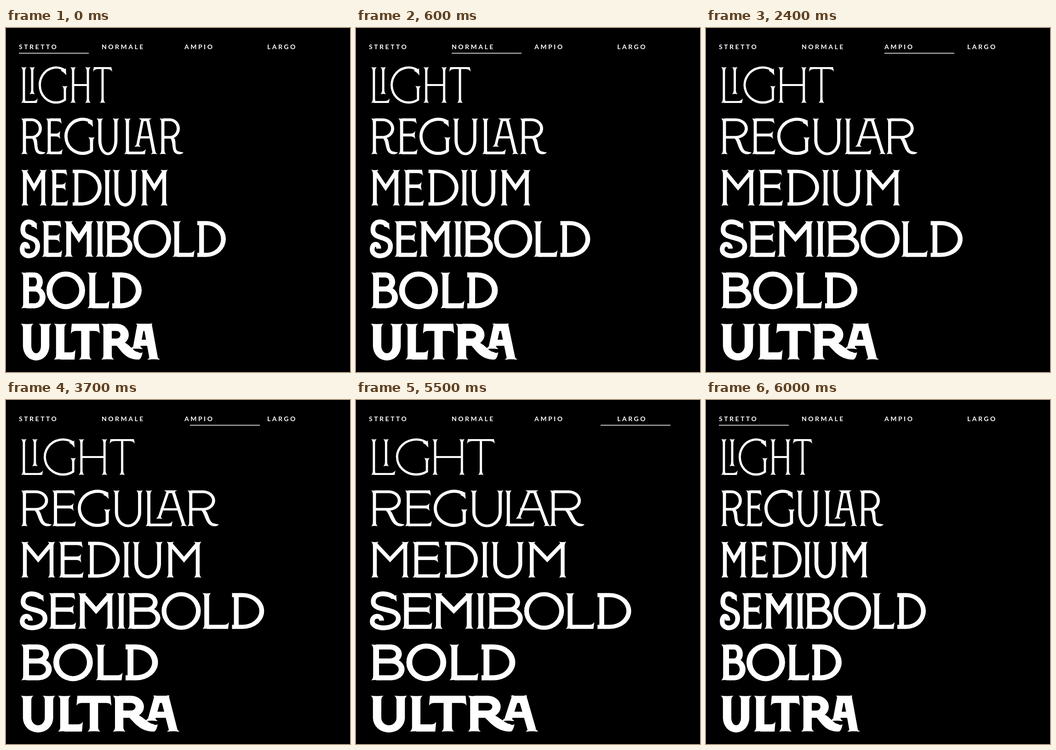
Write an HTML page with a canvas that moves like this. It is 748x748 px and loops after 7200 ms.

```html
<!DOCTYPE html>
<html lang="it">
<head>
<meta charset="utf-8">
<title>Width axis specimen</title>
<style>
  html, body { margin: 0; width: 100%; height: 100%; overflow: hidden; background: #000; }
  canvas { position: absolute; left: 0; top: 0; }
  span {
    position: absolute; top: 31px; color: #fff; white-space: nowrap;
    font: 700 14px/20px Lato, sans-serif; letter-spacing: 3.5px;
  }
</style>
</head>
<body>
<canvas width="748" height="748" role="img" aria-label="Light Regular Medium Semibold Bold Ultra"></canvas>
<span style="left:28px">STRETTO</span>
<span style="left:208px">NORMALE</span>
<span style="left:388px">AMPIO</span>
<span style="left:568px">LARGO</span>
<script>
const ctx = document.querySelector('canvas').getContext('2d');
const CAP = 78, MID = CAP / 2, WAIST = 36, QUARTER = Math.PI / 2;
const WIDTH_STOPS = [0, 0.243, 0.62, 1];

// Left and right edges of each letter at both ends of the width axis.
// Lowercase marks ligature forms.
const rows = [
  { stem: 4.9, text: 'LiGHT',
    narrow: [33,69, 51,63, 71,134, 140,184, 189,231],
    wide: [33,87, 60,72, 88,162, 168,240, 245,307] },
  { stem: 6.8, text: 'REGULAR',
    narrow: [33,86, 87,123, 127,193, 197,246, 257,304, 279,329, 334,386],
    wide: [33,107, 108,168, 172,246, 253,326, 329,394, 352,429, 428,505] },
  { stem: 8.4, text: 'MEDIUM',
    narrow: [33,89, 97,135, 142,208, 213,227, 232,286, 293,352],
    wide: [33,117, 125,187, 194,269, 277,292, 299,371, 380,465] },
  { stem: 10.4, text: 'SEMIBOLD',
    narrow: [30,74, 78,122, 127,190, 196,213, 216,275, 277,359, 362,410, 413,478],
    wide: [30,99, 102,169, 173,260, 266,286, 291,369, 372,459, 463,526, 530,607] },
  { stem: 12.8, text: 'BOLD',
    narrow: [33,86, 88,172, 177,225, 228,295],
    wide: [33,107, 111,198, 205,269, 273,350] },
  { stem: 18.2, text: 'ULTrA',
    narrow: [32,99, 104,151, 141,204, 207,297, 270,335],
    wide: [32,112, 118,176, 160,243, 246,348, 320,401] }
];

let s, h, flare;   // stem width, bar height, serif overhang of the current row

const mix = (a, b, p) => a + (b - a) * p;
const inset = () => flare + s / 2;

function fill(draw) {
  ctx.beginPath();
  draw();
  ctx.fill('evenodd');
}

function stroke(draw, width = s) {
  ctx.lineWidth = width;
  ctx.beginPath();
  draw();
  ctx.stroke();
}

function stem(x, y0 = 0, y1 = CAP, top = flare, bottom = flare) {
  const a = x - s / 2, b = x + s / 2, d = Math.min(10, y1 - y0);
  fill(() => {
    ctx.moveTo(a - top, y0);
    ctx.quadraticCurveTo(x, y0 + 1.5, b + top, y0);
    ctx.quadraticCurveTo(b, y0 + 3, b, y0 + d);
    ctx.lineTo(b, y1 - d);
    ctx.quadraticCurveTo(b, y1 - 3, b + bottom, y1);
    ctx.quadraticCurveTo(x, y1 - 1.5, a - bottom, y1);
    ctx.quadraticCurveTo(a, y1 - 3, a, y1 - d);
    ctx.lineTo(a, y0 + d);
    ctx.quadraticCurveTo(a, y0 + 3, a - top, y0);
  });
}

// Horizontal arm from x0 whose end at x1 flares inwards (dir 1 down, -1 up).
function arm(x0, x1, edge, dir) {
  const side = Math.sign(x1 - x0), inner = edge + dir * h;
  fill(() => {
    ctx.moveTo(x0, edge);
    ctx.lineTo(x1 - 2 * side, edge);
    ctx.lineTo(x1, inner + dir * 6);
    ctx.quadraticCurveTo(x1 - 3 * side, inner, x1 - 11 * side, inner);
    ctx.lineTo(x0, inner);
  });
}

function bowl(x, right, y0, y1, round) {
  const cy = (y0 + y1) / 2, ry = (y1 - y0) / 2;
  const rx = Math.max(s + 2, Math.min((right - x) * round, ry * 1.2)), cx = right - rx;
  fill(() => {
    ctx.moveTo(x, y0);
    ctx.ellipse(cx, cy, rx, ry, 0, -QUARTER, QUARTER);
    ctx.lineTo(x, y1);
    ctx.lineTo(x, y1 - h);
    ctx.ellipse(cx, cy, rx - s, ry - h, 0, QUARTER, -QUARTER, true);
    ctx.lineTo(x, y0 + h);
  });
}

// Hanging tip that closes the upper curve of G and S.
function tip(x, y, back) {
  fill(() => {
    ctx.moveTo(x - back, y - s / 2);
    ctx.lineTo(x - 2, y - 1);
    ctx.lineTo(x + 1, y - 5);
    ctx.lineTo(x + 2, y + 11);
    ctx.quadraticCurveTo(x - 3, y + 4, x - back, y + s / 2 - 1);
  });
}

// Sweeping leg of R, tapering to an upturned point.
function leg(x, y, right, tipY) {
  fill(() => {
    ctx.moveTo(x - s / 2, y);
    ctx.bezierCurveTo(x + 8, y + 4 + s / 2, right - 24 - s, CAP, right - 9, CAP);
    ctx.quadraticCurveTo(right - 3, CAP, right, tipY);
    ctx.quadraticCurveTo(right - 5, CAP - s * 0.7, right - 10, CAP - s * 0.9);
    ctx.bezierCurveTo(right - 23, CAP - s, x + s + 8, y, x + s / 2, y);
  });
}

const glyphs = {
  A(l, r) {
    const apex = mix(l, r, 0.47), gap = 4 + s * 0.17, half = 12 + s * 0.35;
    const foot = 66 - s * 0.6, left = l + inset(), right = r - inset();
    stroke(() => {
      ctx.moveTo(apex - gap, 1);
      ctx.lineTo(left, foot - 3);
    }, h);
    stroke(() => {
      ctx.moveTo(apex + gap, 1);
      ctx.lineTo(right, CAP - 3);
    });
    fill(() => {
      ctx.moveTo(apex - half, 0);
      ctx.lineTo(apex + half, 0);
      ctx.quadraticCurveTo(apex + half - 6, 3, apex + half - 7, h);
      ctx.lineTo(apex - half + 7, h);
      ctx.quadraticCurveTo(apex - half + 6, 3, apex - half, 0);
    });
    stem(left, foot - 5, foot, 0);
    stem(right, CAP - 5, CAP, 0);
    ctx.fillRect(left + 3, 41 - h * 0.4, mix(apex, right, 0.55) - left - 3, h * 0.85);
  },
  B(l, r) {
    const x = l + inset();
    stem(x);
    bowl(x, r - 6, 0, WAIST + h / 2, 0.5);
    bowl(x, r, WAIST - h / 2, CAP, 0.55);
  },
  D(l, r) {
    stem(l + 3 + inset());
    bowl(l + 3, r, 0, CAP, 0.68);
  },
  E(l, r) {
    const x = l + inset();
    stem(x);
    arm(x, r - 2, 0, 1);
    arm(x, r, CAP, -1);
    arm(x, r - 5, WAIST - h / 2, 1);
    arm(x, r - 5, WAIST + h / 2, -1);
  },
  G(l, r) {
    const cx = mix(l, r, 0.6), rx = cx - l - s / 2, ry = 40.5 - s / 2;
    const spur = r - inset(), angle = Math.acos((spur - cx) / rx);
    const reach = ry * Math.sin(angle);
    stroke(() => ctx.ellipse(cx, MID, rx, ry, 0, -angle, angle, true));
    tip(spur + 1, MID - reach, 9);
    stem(spur, 41, MID + reach + 2, flare, 0);
  },
  H(l, r) {
    const a = l + inset(), b = r - inset();
    stem(a);
    stem(b);
    ctx.fillRect(a, MID - h / 2, b - a, h);
  },
  I(l, r) { stem((l + r) / 2); },
  i(l, r) { stem((l + r) / 2, 0, 59); },
  L(l, r) {
    const x = l + inset();
    stem(x);
    arm(x, r, CAP, -1);
  },
  M(l, r) {
    const a = l + inset(), b = r - inset();
    stem(a);
    stem(b);
    stroke(() => {
      ctx.moveTo(a, 4);
      ctx.lineTo((a + b) / 2, 43 - s / 2);
      ctx.lineTo(b, 4);
    });
  },
  O(l, r) {
    const cx = (l + r) / 2, rx = (r - l) / 2, ry = 41;
    fill(() => {
      ctx.ellipse(cx, MID, rx, ry, 0, 0, 2 * Math.PI);
      ctx.moveTo(cx + rx - s, MID);
      ctx.ellipse(cx, MID, rx - s, ry - h, 0, 0, 2 * Math.PI);
    });
  },
  R(l, r) {
    const x = l + inset();
    stem(x);
    bowl(x, r - 8, 0, 44, 0.58);
    leg(mix(x, r, 0.4), 42, r, CAP - 4);
  },
  r(l, r) {
    const x = l + inset();
    stem(x);
    bowl(x, r - 30, 0, 48, 0.58);
    leg(mix(x, r, 0.27), 40, r, 62);
  },
  S(l, r) {
    const X = u => l + s / 2 + u * (r - l - s);
    const curve = (a, b, c, d, e, f) => ctx.bezierCurveTo(X(a), b, X(c), d, X(e), f);
    stroke(() => {
      ctx.moveTo(X(0.82), 10);
      curve(0.66, -1, 0.04, -4, 0.04, 19);
      curve(0.04, 42, 1, 30, 1, 55);
      curve(1, 80, 0.02, 82, 0, 62);
      curve(0, 47, 0.36, 47, 0.36, 60);
    });
    tip(X(0.9), 8, 10);
  },
  T(l, r) {
    const x = (l + r) / 2;
    stem(x, 0, CAP, 0);
    arm(x, l, 0, 1);
    arm(x, r, 0, 1);
  },
  U(l, r) {
    const a = l + flare, b = r - flare, cx = (a + b) / 2, rx = (b - a) / 2, ry = 32, y = CAP + 2 - ry;
    stem(a + s / 2, 0, y + 1, flare, 0);
    stem(b - s / 2, 0, y + 1, flare, 0);
    fill(() => {
      ctx.ellipse(cx, y, rx, ry, 0, 0, Math.PI);
      ctx.ellipse(cx, y, rx - s, ry - h, 0, Math.PI, 0, true);
    });
  }
};

function drawRow({ stem: weight, text, narrow, wide }, index, width) {
  s = weight;
  h = weight * 0.86;
  flare = 3 + weight * 0.1;
  ctx.save();
  ctx.translate(0, 85 + index * 111.6);
  const edge = k => mix(narrow[k], wide[k], width);
  [...text].forEach((letter, k) => glyphs[letter](edge(2 * k), edge(2 * k + 1)));
  ctx.restore();
}

function render(now) {
  const time = now % 7200;
  const from = Math.floor(time / 1800), to = (from + 1) % 4;
  const step = Math.min(6, Math.floor(time % 1800 / 100));
  const p = (1 - Math.cos(Math.PI * step / 6)) / 2;

  ctx.clearRect(0, 0, 748, 748);
  ctx.fillStyle = ctx.strokeStyle = '#fff';
  ctx.fillRect(28 + 180 * mix(from, to, p), 54, 152, 1.5);
  const width = mix(WIDTH_STOPS[from], WIDTH_STOPS[to], p);
  rows.forEach((row, index) => drawRow(row, index, width));
}

const start = performance.now();
function tick() {
  render(performance.now() - start);
  requestAnimationFrame(tick);
}
tick();
</script>
</body>
</html>
```
